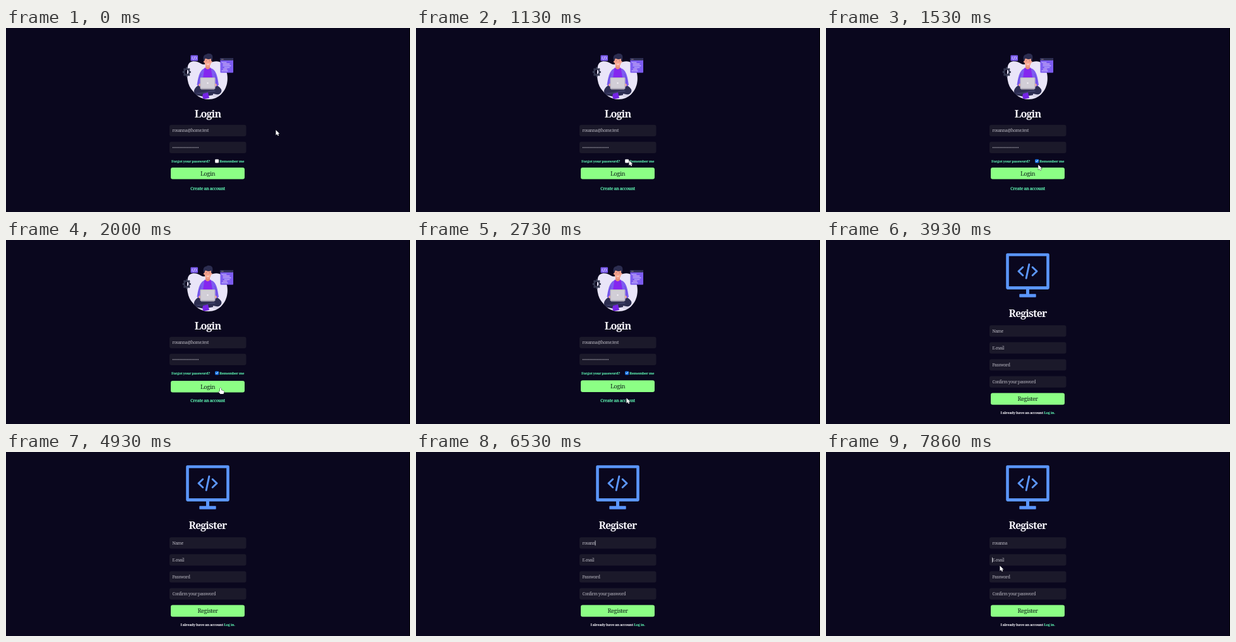
An HTML page with a canvas for the animation above (8000 ms loop, 640 px wide and 294 px high).

```html
<!DOCTYPE html>
<html lang="en">
<head>
<meta charset="utf-8">
<title>Login and register</title>
<style>
html, body { margin: 0; width: 100%; height: 100%; overflow: hidden; background: #0a071e; }
canvas { display: block; }
</style>
</head>
<body>
<canvas id="stage" width="640" height="294"></canvas>
<script>
const ctx = document.getElementById('stage').getContext('2d');
const LOOP = 8000, CENTER = 319.5;
const REGISTER_AT = 3260, FONT_READY_AT = 3330, CHECK_AT = 1330;
const MINT = '#5ff7b4', GRAY = '#bab8c2', NAVY = '#2c2d50', VIOLET = '#7c5cf0', SKIN = '#f5a48d';
const SLAB = { family: '"Noto Serif", serif', spacing: -0.055 };
const TIMES = { family: '"Liberation Serif", serif', spacing: 0 };
const TYPED = 'rosanna';
const KEY_TIMES = [5530, 5600, 5860, 5930, 6130, 6530, 6600];

// Pointer stops: time, x, y
const ROUTE = [
  [0, 427.5, 163], [60, 427.5, 163], [600, 370, 190], [1000, 345, 198],
  [1130, 337.5, 211.5], [1270, 335, 212.5], [1400, 335, 212.5], [1800, 340, 236],
  [2060, 340, 236], [2660, 333.5, 252.5], [2860, 333.5, 252.5], [3000, 333, 256.5],
  [3800, 333, 256.5], [4060, 285, 147], [7130, 280, 149], [7300, 277, 158],
  [7530, 276, 172], [7730, 276, 172], [7860, 275.5, 181.8], [8000, 275.5, 181.8]
];

const clamp = v => Math.max(0, Math.min(1, v));
const ramp = (t, from, to) => {
  const p = clamp((t - from) / (to - from));
  return p * p * (3 - 2 * p);
};

function pointerAt(t) {
  const i = Math.max(1, ROUTE.findIndex(stop => stop[0] > t));
  const [t0, x0, y0] = ROUTE[i - 1], [t1, x1, y1] = ROUTE[i];
  const p = ramp(t, t0, t1);
  return { x: x0 + (x1 - x0) * p, y: y0 + (y1 - y0) * p };
}

function box(x, y, w, h, color, radius = 0) {
  ctx.fillStyle = color;
  ctx.beginPath();
  ctx.roundRect(x, y, w, h, radius);
  ctx.fill();
}

function disc(x, y, r, color) {
  ctx.fillStyle = color;
  ctx.beginPath();
  ctx.arc(x, y, r, 0, 2 * Math.PI);
  ctx.fill();
}

function shape(path, color) {
  ctx.fillStyle = color;
  ctx.fill(new Path2D(path));
}

function line(path, color, width) {
  ctx.strokeStyle = color;
  ctx.lineWidth = width;
  ctx.lineCap = ctx.lineJoin = 'round';
  ctx.stroke(new Path2D(path));
}

function setFont(size, weight, face) {
  ctx.font = `${weight} ${size}px ${face.family}`;
  ctx.letterSpacing = `${face.spacing * size}px`;
}

function text(str, x, y, size, color, { weight = 400, align = 'left', face = SLAB } = {}) {
  setFont(size, weight, face);
  ctx.textAlign = align;
  ctx.fillStyle = color;
  ctx.fillText(str, x, y);
  return ctx.measureText(str).width;
}

const centered = (str, y, size, color, weight, face) =>
  text(str, CENTER, y, size, color, { weight, face, align: 'center' });

function field(y, content, size = 6.75, face = SLAB) {
  box(259, y, 121.5, 18.2, '#1b192a', 3);
  return content ? text(content, 263.4, y + 11.5, size, GRAY, { face }) : 0;
}

function button(label, y, size, face = SLAB) {
  box(261, y, 117, 18.6, '#8cff85', 3);
  centered(label, y + 12.8, size, '#11251d', 400, face);
}

function gear(x, y) {
  const color = '#343850';
  ctx.save();
  ctx.translate(x, y);
  ctx.scale(0.88, 1.08);
  for (let i = 0; i < 8; i++) {
    box(-1.5, -7.4, 3, 3, color, 0.5);
    ctx.rotate(Math.PI / 4);
  }
  ctx.lineWidth = 2.6;
  ctx.strokeStyle = color;
  ctx.beginPath();
  ctx.arc(0, 0, 4.5, 0, 2 * Math.PI);
  ctx.stroke();
  ctx.restore();
}

function codeWindow() {
  box(339.5, 48, 20.5, 23.5, VIOLET, 1);
  box(339.5, 48, 20.5, 3.8, NAVY, 1);
  disc(342, 50, 0.6, '#ffffff');
  disc(344, 50, 0.6, '#f4a0c0');
  [[342, 7], [344, 10], [344, 12], [346, 8], [344, 6], [342, 9]].forEach(([x, w], i) => {
    const y = 55 + i * 2.7;
    line(`M${x} ${y}h${w}`, i % 3 === 1 ? '#f6d9f4' : '#d8ccff', 1);
  });
}

function developer() {
  // Backdrop
  shape('M288 61C290 51 302 52 309 57C317 62 327 50 338 54C349 59 353 77 350 89C347 102 337 114 321 114C307 114 300 106 293 97C286 87 286 70 288 61Z', '#e9e5f8');
  gear(286.3, 70.3);
  box(292.5, 43.5, 11.5, 9, VIOLET, 1);
  line('M296 46l-1.5 2l1.5 2M300.5 46l1.5 2l-1.5 2M299 45.8l-1.4 4.4', '#eee8ff', 0.8);
  codeWindow();

  // Legs and shoe
  shape('M308 90C301 93 297 98 298 103C300 108 309 110 317 109L329 107C338 108 343 103 341 98C338 93 333 91 330 90Z', NAVY);
  line('M302 104C312 106 322 100 331 101', '#444672', 1.2);
  shape('M312 105L320 103L322 112L314 113.5Q310 112 312 105Z', '#7423e4');
  shape('M328 105L338 107Q336 111 328 110Z', '#d9d5e8');

  // Torso and arms
  shape('M314 64.5H325C331 66 334 74 335.5 82L337 91L330 95H310L302.5 91C304 81 306 68 314 64.5Z', VIOLET);
  shape('M314.5 63.5H324.5L329.5 94H310Z', '#8527ef');
  line('M309 74C306 80 304.5 86 305 90L310 91M330.5 74C333 79 335 86 333 90L329 91', '#654ad6', 0.9);
  shape('M316 57H323V64Q319.5 68 316 64Z', '#e68e7b');

  // Head
  shape('M314.5 48Q319 45 325 48V55Q324 61.5 319.5 62Q315 61 314.5 55Z', SKIN);
  disc(314.3, 54, 1.4, SKIN);
  disc(325.2, 54, 1.4, SKIN);
  shape('M313.5 53C311.5 47 313 42.5 317 42.3C319 39.5 326 40.5 327 44C328 48 327 51 326 53L324.8 49Q320 51 316 48.5Z', NAVY);
  line('M317 52.4h1M321.8 52.4h1', '#8c5360', 0.7);
  line('M318 57.7Q320 59 322 57.5', '#ffffff', 0.8);

  // Laptop
  disc(307.5, 91, 2.3, SKIN);
  disc(331.5, 91, 2.3, SKIN);
  box(307.5, 79, 24, 18.5, '#bebac5', 1.5);
  box(309, 80.3, 21, 15.5, '#d1ced6', 1);
  box(309, 97, 21, 1.5, '#9995a5', 0.5);
  disc(319.5, 88, 1.2, '#f4f2f7');
}

function monitor(dy) {
  const blue = '#5b96fb';
  ctx.save();
  ctx.translate(0, dy);
  ctx.strokeStyle = blue;
  ctx.lineWidth = 4.6;
  ctx.lineJoin = 'round';
  ctx.strokeRect(287.5, 23.5, 64, 53);
  box(287, 74, 65, 5, blue);
  box(317, 78, 5, 10, blue);
  box(306.3, 86.3, 26.4, 5.3, blue, 0.8);
  line('M311.8 43.5L305 50L311.8 56.5M327.2 43.5L334 50L327.2 56.5M321.8 39L317.2 61', blue, 3);
  ctx.restore();
}

function checkbox(checked) {
  box(331.2, 209.7, 5.8, 5.8, checked ? '#1878ef' : '#ffffff', 1);
  if (checked) line('M332.5 212.7l1.2 1.2l2.2 -2.7', '#ffffff', 0.9);
}

function loginPage(t) {
  const press = 2 * (ramp(t, 1520, 1800) - ramp(t, 2630, 2930));
  developer();
  centered('Login', 142.5, 16.2, '#f4f3f8', 700);
  field(154.8, TYPED + '@home.test');
  field(181.8);
  for (let i = 0; i < 19; i++) disc(264.5 + i * 2.22, 191, 0.72, GRAY);
  text('Forgot your password?', 262, 215, 5.85, MINT, { weight: 700 });
  checkbox(t >= CHECK_AT);
  text('Remember me', 338, 215, 5.8, MINT, { weight: 700 });
  button('Login', 222.9 + press, 9.5);
  centered('Create an account', 259, 6.7, MINT, 700);
}

function footer(y, size, face) {
  const lead = 'I already have an account ', link = 'Log in.';
  setFont(size, 700, face);
  const x = CENTER - ctx.measureText(lead + link).width / 2;
  const w = text(lead, x, y, size, '#f4f3f8', { weight: 700, face });
  text(link, x + w, y, size, MINT, { weight: 700, face });
}

function caret(x, y) {
  box(x, y + 5.2, 0.8, 8, '#e4e3ea');
}

function registerPage(t) {
  const plain = t < FONT_READY_AT;
  const face = plain ? TIMES : SLAB;
  const shift = plain ? -1 : 0;
  const size = plain ? 6.3 : 6.75;
  const typed = TYPED.slice(0, KEY_TIMES.filter(k => k <= t).length);
  const rows = [typed || 'Name', 'E-mail', 'Password', 'Confirm your password'];
  const rowY = i => 136.2 + shift + i * 27.1;

  monitor(plain ? 2 : 0);
  centered('Register', 123.3, plain ? 15 : 16, '#f4f3f8', 700, face);
  const widths = rows.map((label, i) => field(rowY(i), label, size, face));
  button('Register', 244.6 + shift, plain ? 8.7 : 9.4, face);
  footer(plain ? 275.6 : 277.5, plain ? 5.3 : 5.8, face);

  const nameFocused = (t >= 4530 && t < 4930) || (t >= 5530 && t < 7130);
  if (nameFocused) caret(263.2 + (typed ? widths[0] : 0), rowY(0));
  if (t >= 7730) caret(263.2, rowY(1));
}

function pointerKind(t, x, y) {
  const inside = (left, top, right, bottom) => x >= left && x <= right && y >= top && y <= bottom;
  const login = t < REGISTER_AT;
  const fields = login ? [154.8, 181.8] : [136, 163.1, 190.2, 217.3];
  if (fields.some(top => inside(259, top, 380.5, top + 18.2))) return 'text';
  const overButton = login ? inside(261, 223, 378, 243) : inside(261, 244, 378, 263);
  const overLink = login && inside(292, 253, 347, 262);
  return overButton || overLink ? 'hand' : 'arrow';
}

function pointer(t) {
  const { x, y } = pointerAt(t);
  const kind = pointerKind(t, x, y);
  // The text cursor is not visible on the dark fields.
  if (kind === 'text') return;
  ctx.save();
  ctx.translate(x, y);
  const outline = kind === 'hand'
    ? 'M-1 1Q0 -0.5 1 1V4L5 5Q6 5.5 5.5 7L4.5 10H-0.5L-3.5 6.5Q-3 5 -1 6.5Z'
    : 'M0 0V8.2L1.9 6.5L3.2 9.2L4.7 8.5L3.4 5.9H5.8Z';
  line(outline, '#15131f', 0.8);
  shape(outline, '#ffffff');
  ctx.restore();
}

function draw(now) {
  const t = now % LOOP;
  box(0, 0, 640, 294, '#0a071e');
  box(639, 0, 1, 294, '#000000');
  (t < REGISTER_AT ? loginPage : registerPage)(t);
  pointer(t);
}

const start = performance.now();
function tick() {
  draw(performance.now() - start);
  requestAnimationFrame(tick);
}
tick();
</script>
</body>
</html>
```
